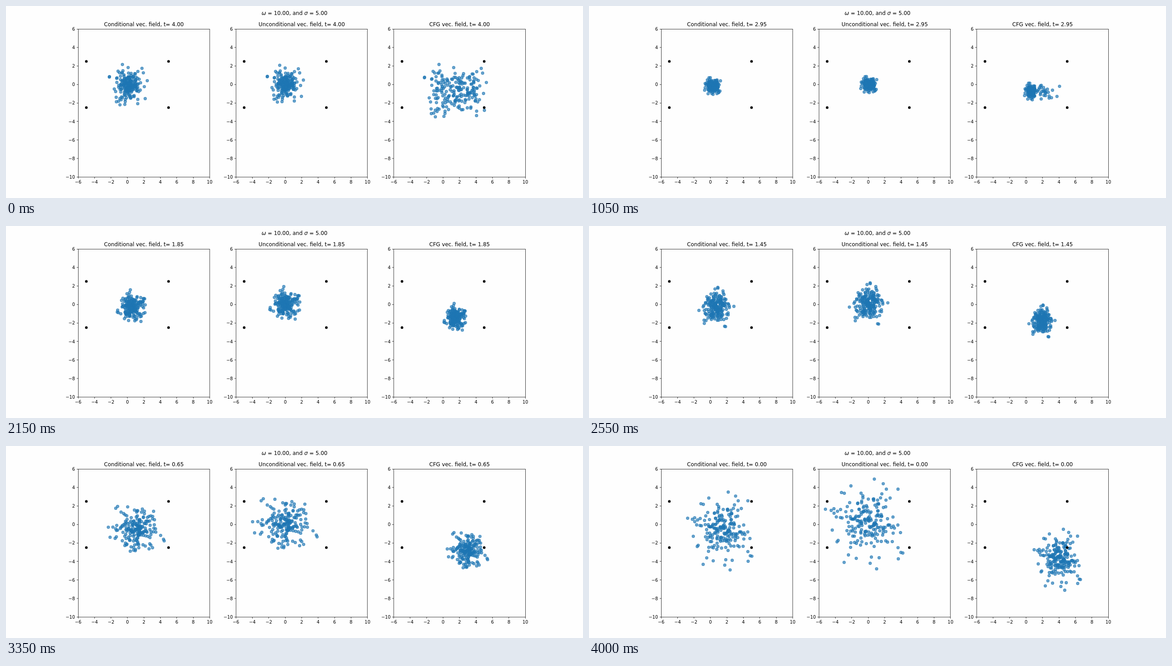
An HTML page with a canvas for the animation above (4.05 s loop, 1280 by 427 pixels).

```html
<!DOCTYPE html>
<html lang="en">
<head>
<meta charset="utf-8">
<title>Vector fields</title>
<style>
  html, body { margin: 0; width: 100%; height: 100%; overflow: hidden; background: #fefefe; }
  canvas { display: block; width: 1280px; height: 427px; }
</style>
</head>
<body>
<canvas id="stage"></canvas>
<script>
const canvas = document.getElementById('stage');
const ctx = canvas.getContext('2d');
const dpr = window.devicePixelRatio || 1;
canvas.width = 1280 * dpr;
canvas.height = 427 * dpr;

// The figure is laid out on an 18 x 6 inch sheet at 100 dpi.
const WIDTH = 1800, HEIGHT = 600, PT = 100 / 72;
ctx.scale(canvas.width / WIDTH, canvas.height / HEIGHT);

const STEPS = 81, STEP_MS = 50, COUNT = 200;
const LEFT = 0.125 * WIDTH, TOP = 0.12 * HEIGHT, BOTTOM = 0.89 * HEIGHT;
const PANEL_W = 0.775 * WIDTH / 3.4, PANEL_GAP = 1.2 * PANEL_W;
const UNIT_X = PANEL_W / 16, UNIT_Y = (BOTTOM - TOP) / 16;
const LARGE = 12 * PT, SMALL = 10 * PT;

const toY = y => TOP + (6 - y) * UNIT_Y;
const snap = v => Math.floor(v) + 0.5;

let seed = 7;
function random() {
  seed = (seed + 0x6D2B79F5) | 0;
  let v = Math.imul(seed ^ (seed >>> 15), 1 | seed);
  v = (v + Math.imul(v ^ (v >>> 7), 61 | v)) ^ v;
  return ((v ^ (v >>> 14)) >>> 0) / 4294967296;
}
const gauss = () => Math.sqrt(-2 * Math.log(1 - random())) * Math.cos(2 * Math.PI * random());

// Stationary random walk, with a dense core and a few stragglers.
function makeWalk() {
  const keep = 0.95, kick = Math.sqrt(1 - keep * keep);
  let x = gauss(), y = gauss();
  return Array.from({ length: STEPS }, () => {
    const r = Math.hypot(x, y);
    const spread = Math.min(0.82 + 0.1 * r, 3 / r);
    const point = [x * spread, y * spread];
    x = keep * x + kick * gauss();
    y = keep * y + kick * gauss();
    return point;
  });
}
const walks = Array.from({ length: COUNT }, makeWalk);

function smoothstep(a, b, v) {
  const s = Math.min(1, Math.max(0, (v - a) / (b - a)));
  return s * s * (3 - 2 * s);
}

// The clouds contract quickly, then grow with the square of elapsed time u.
function shapeAt(u) {
  const burst = Math.exp(-u / 0.18);
  const rise = Math.min(1, u / 0.25);
  const split = 1 - smoothstep(0.35, 0.95, u);
  const grow = u * u;
  return {
    spread: 0.26 + 0.1 * grow + 0.55 * burst,
    shift: 0.16 + 0.09 * grow,
    ratio: 1.05 - 0.055 * u,
    guidedX: 0.45 + 0.23 * grow + 1.1 * split,
    guidedY: -0.47 - 0.21 * grow - 0.25 * split,
    guidedSpread: 0.28 + 0.052 * grow + 0.47 * burst + 0.05 * split,
    splitX: (1.6 + 2.3 * rise) * split,
    splitY: (0.6 + 0.9 * rise) * split,
    sharp: 1.3 + 4.7 * rise,
    edge: 0.55 * rise,
    tail: 1.6 * Math.exp(-(((u - 1.05) / 0.3) ** 2))
  };
}

const PANELS = [
  { name: 'Conditional', place: ([x, y], s) => [
      s.shift + x * s.spread * s.ratio,
      -0.45 * s.shift + y * s.spread * 0.92 * s.ratio] },
  { name: 'Unconditional', place: ([x, y], s) => [
      0.06 + x * s.spread,
      0.04 + y * s.spread * 0.88] },
  { name: 'CFG', place: ([x, y], s) => [
      s.guidedX + x * s.guidedSpread + s.splitX * Math.tanh(s.sharp * (x - s.edge))
        + s.tail * Math.max(0, x - 1.05),
      s.guidedY + y * s.guidedSpread + s.splitY * Math.tanh(s.sharp * (y + 0.1))] }
];

function text(str, x, y, size, align = 'center', style = '') {
  ctx.font = `${style} ${size}px "DejaVu Sans", sans-serif`;
  ctx.textAlign = align;
  ctx.fillText(str, x, y);
}

function line(x1, y1, x2, y2) {
  ctx.beginPath();
  ctx.moveTo(x1, y1);
  ctx.lineTo(x2, y2);
  ctx.stroke();
}

function dot(x, y, size) {
  ctx.beginPath();
  ctx.arc(x, y, size * PT / 2, 0, 2 * Math.PI);
  ctx.fill();
  ctx.stroke();
}

function drawHeading() {
  const parts = [['ω', 'italic'], [' = 10.00, and ', ''], ['σ', 'italic'], [' = 5.00', '']];
  const widths = parts.map(([str, style]) => {
    ctx.font = `${style} ${LARGE}px "DejaVu Sans", sans-serif`;
    return ctx.measureText(str).width;
  });
  let x = (WIDTH - widths.reduce((a, b) => a + b)) / 2;
  parts.forEach(([str, style], i) => {
    text(str, x, 28, LARGE, 'left', style);
    x += widths[i];
  });
}

function drawAxes(left, toX) {
  const x0 = snap(left), x1 = snap(left + PANEL_W), y0 = snap(TOP), y1 = snap(BOTTOM);
  const tick = 3.5 * PT;
  const label = v => String(v).replace('-', '\u2212');
  ctx.lineWidth = 1.1;
  ctx.strokeRect(x0, y0, x1 - x0, y1 - y0);
  for (let v = -6; v <= 10; v += 2) {
    line(snap(toX(v)), y1, snap(toX(v)), y1 + tick);
    text(label(v), toX(v), BOTTOM + 2 * tick + 11, SMALL);
  }
  for (let v = -10; v <= 6; v += 2) {
    line(x0 - tick, snap(toY(v)), x0, snap(toY(v)));
    text(label(v), left - 2 * tick, toY(v) + 5.3, SMALL, 'right');
  }
}

function drawPanel(panel, index, step, shape) {
  const left = LEFT + index * PANEL_GAP;
  const toX = x => left + (x + 6) * UNIT_X;

  ctx.fillStyle = ctx.strokeStyle = '#1f77b4';
  ctx.globalAlpha = 0.65;
  ctx.lineWidth = 1.4 * PT;
  for (const walk of walks) {
    const [x, y] = panel.place(walk[step], shape);
    dot(toX(x), toY(y), 6);
  }

  ctx.globalAlpha = 1;
  ctx.fillStyle = ctx.strokeStyle = '#000';
  for (const x of [-5, 5])
    for (const y of [-2.5, 2.5]) dot(toX(x), toY(y), Math.sqrt(20));

  drawAxes(left, toX);
  const time = (4 - step / 20).toFixed(2);
  text(`${panel.name} vec. field, t= ${time}`, left + PANEL_W / 2, TOP - 6 * PT, LARGE);
}

let shown = -1;
function draw(now) {
  const step = Math.floor(now / STEP_MS) % STEPS;
  if (step !== shown) {
    shown = step;
    ctx.fillStyle = '#fefefe';
    ctx.fillRect(0, 0, WIDTH, HEIGHT);
    ctx.fillStyle = '#000';
    drawHeading();
    const shape = shapeAt(step / 20);
    PANELS.forEach((panel, i) => drawPanel(panel, i, step, shape));
  }
  requestAnimationFrame(draw);
}
draw(performance.now());
</script>
</body>
</html>
```
